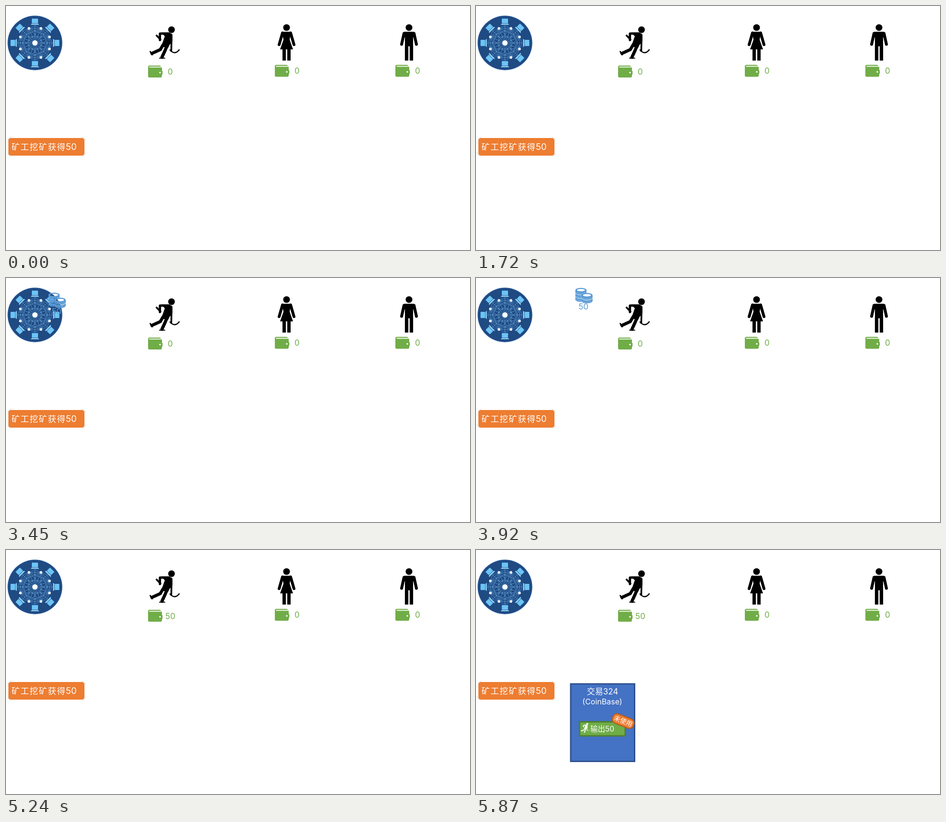
An HTML page with a canvas that plays this animation: 970x512 px, repeating every 7.9 s.

```html
<!DOCTYPE html>
<html lang="zh">
<head>
<meta charset="utf-8">
<title>挖矿奖励</title>
<style>
html, body { margin: 0; width: 100%; height: 100%; overflow: hidden; background: #fff; }
canvas { display: block; width: 970px; height: 512px; }
</style>
</head>
<body>
<canvas id="stage" width="970" height="512"></canvas>
<script>
const LOOP = 7900, STEP = 78.5;
const GREEN = '#70ad47', BLUE = '#5b9bd5', ORANGE = '#ed7d31';
const FONT = 'Inter, "Noto Sans CJK SC", "Noto Sans CJK", sans-serif';
const ctx = document.getElementById('stage').getContext('2d');
const clamp = v => Math.max(0, Math.min(1, v));

function at(c, x, y, scale, angle, draw) {
  c.save();
  c.translate(x, y);
  c.rotate(angle);
  c.scale(scale, scale);
  draw(c);
  c.restore();
}

function dot(c, x, y, r, color) {
  c.fillStyle = color;
  c.beginPath();
  c.arc(x, y, r, 0, Math.PI * 2);
  c.fill();
}

function poly(c, pts, color) {
  c.fillStyle = color;
  c.beginPath();
  pts.forEach(p => c.lineTo(p[0], p[1]));
  c.closePath();
  c.fill();
}

function line(c, pts, width, color, cap = 'round') {
  c.strokeStyle = color;
  c.lineWidth = width;
  c.lineCap = cap;
  c.lineJoin = 'round';
  c.beginPath();
  pts.forEach(p => c.lineTo(p[0], p[1]));
  c.stroke();
}

function box(c, x, y, w, h, r, fill, stroke, width) {
  c.beginPath();
  c.roundRect(x, y, w, h, r);
  if (fill) { c.fillStyle = fill; c.fill(); }
  if (stroke) { c.strokeStyle = stroke; c.lineWidth = width; c.stroke(); }
}

function label(c, text, x, y, size, color, align = 'center', weight = 400) {
  c.font = `${weight} ${size}px ${FONT}`;
  c.textAlign = align;
  c.textBaseline = 'alphabetic';
  c.fillStyle = color;
  c.fillText(text, x, y + size * 0.36);
}

function laptop(c) {
  box(c, -6.5, -6.5, 13, 9.5, 1, '#6cc4f5');
  poly(c, [[-6.5, 3.8], [6.5, 3.8], [8.8, 6.6], [-8.8, 6.6]], '#8fd2f8');
}

function network(c) {
  dot(c, 0, 0, 57.2, '#2c5c9c');
  dot(c, 0, 0, 56, '#1f4a82');
  const ring = (r, shift) => Array.from({ length: 8 }, (_, i) => {
    const a = (i + shift) * Math.PI / 4;
    return [r * Math.cos(a), r * Math.sin(a)];
  });
  const nodes = ring(33, 0.5), outer = ring(36, 0);
  nodes.forEach((p, i) => {
    nodes.slice(i + 1).forEach(q => line(c, [p, q], 0.8, '#6aaade'));
    line(c, [[0, 0], outer[i]], 0.8, '#6aaade');
    line(c, [p, outer[i]], 0.9, '#4d8fcc');
    line(c, [p, outer[(i + 1) % 8]], 0.9, '#4d8fcc');
  });
  nodes.forEach(p => dot(c, p[0], p[1], 2.7, '#fff'));
  dot(c, 0, 0, 5.5, '#fff');
  ring(44.5, 0).forEach((p, i) => at(c, p[0], p[1], 1, i === 2 ? 0 : (i + 2) * Math.PI / 4, laptop));
}

// Digging figure, 63 x 68 units from its top left corner
function miner(c, color) {
  dot(c, 46, 7.2, 7, color);
  poly(c, [[24, 13], [40, 13], [46, 15.5], [48, 19], [48, 31], [42, 39], [38, 47], [25, 41], [32, 21]], color);
  line(c, [[41, 15.3], [21.8, 15.3], [21.8, 29]], 4.8, color);
  line(c, [[14.8, 19.5], [23, 28]], 3.8, color);
  line(c, [[46.2, 18], [45.5, 52]], 3.6, color);
  c.beginPath();
  c.moveTo(43, 50);
  c.quadraticCurveTo(53, 61, 62, 49.5);
  c.strokeStyle = color;
  c.lineWidth = 2.6;
  c.stroke();
  line(c, [[29, 38], [22.5, 49], [5, 57]], 6.4, color);
  line(c, [[1.5, 53], [5.5, 60]], 2.6, color);
  line(c, [[36, 42], [32.5, 51], [26, 65]], 6.6, color);
  line(c, [[21, 67], [32, 67]], 2, color);
}

function woman(c) {
  const k = '#000';
  dot(c, 0, 7.3, 7, k);
  poly(c, [[-9, 16], [9, 16], [6.5, 33], [13.5, 53], [-13.5, 53], [-6.5, 33]], k);
  for (const s of [-1, 1]) {
    line(c, [[s * 8.5, 18.5], [s * 15.5, 43]], 6, k);
    c.fillRect(s * 5 - 3.5, 52, 7, 24.5);
  }
}

function man(c) {
  const k = '#000';
  dot(c, 0, 7.3, 7, k);
  box(c, -13, 16, 26, 12, 5, k);
  c.fillRect(-8.5, 18, 17, 28.5);
  for (const s of [-1, 1]) {
    line(c, [[s * 10.5, 19.5], [s * 15.5, 42.5]], 6, k);
    c.fillRect(s * 5 - 3.6, 45, 7.2, 31.5);
  }
}

function wallet(c) {
  box(c, 0, 0, 27, 8, 3, GREEN);
  box(c, 0, 2, 29, 23, 3, GREEN);
  line(c, [[3, 3.2], [29, 3.2]], 1.8, '#fff');
  box(c, 22, 10.5, 8.3, 9, 2, GREEN);
  dot(c, 25, 14.8, 1.7, '#fff');
}

function coin(c, x, y) {
  const rx = 11.7, ry = 4.8, h = 4.8;
  c.fillStyle = BLUE;
  c.beginPath();
  c.ellipse(x, y, rx, ry, 0, Math.PI, 0);
  c.ellipse(x, y + h, rx, ry, 0, 0, Math.PI);
  c.fill();
  c.globalCompositeOperation = 'destination-out';
  c.beginPath();
  c.ellipse(x, y, rx - 3.4, ry - 2.3, 0, 0, Math.PI * 2);
  c.fill();
  for (let i = -2; i <= 2; i++) {
    const dx = i * 4, dy = ry * Math.sqrt(1 - (dx / rx) ** 2);
    line(c, [[x + dx, y + dy + 1.4], [x + dx, y + dy + 3]], 0.8, '#000', 'butt');
  }
  c.lineWidth = 0.7;
  c.beginPath();
  c.ellipse(x, y + h + 0.6, rx, ry, 0, 0, Math.PI);
  c.stroke();
  c.globalCompositeOperation = 'source-over';
}

const sprite = document.createElement('canvas');
sprite.width = 120;
sprite.height = 120;
at(sprite.getContext('2d'), 60, 60, 2, 0, c => {
  [-4, -11.5, -19].forEach(y => coin(c, -6.3, y));
  [-1, -8.3].forEach(y => coin(c, 6.3, y));
  label(c, '50', -1, 15.5, 17, BLUE);
});

function coins(t) {
  const k = 2890 + Math.floor((t - 2890) / STEP) * STEP;
  const size = 1 - clamp((k - 4300) / 500);
  if (k < 2890 || size <= 0) return;
  const p = clamp((k - 3030) / 1580);
  const s = p < 0.5 ? 2 * p * p : 1 - 2 * (1 - p) ** 2;
  const bend = s < 0.5 ? 21.5 : 32;
  const x = 73 + 251 * s, y = 43 + bend * (2 * s - 1) ** 2;
  ctx.globalAlpha = clamp((k - 2890) / 500) * size;
  at(ctx, x, y, size / 2, 0, c => c.drawImage(sprite, -60, -60));
  ctx.globalAlpha = 1;
}

function button() {
  ctx.strokeStyle = '#dcdcdc';
  ctx.lineWidth = 1;
  [[12, 283, 2], [158, 283, 3], [158, 308, 0], [12, 308, 1]].forEach(([x, y, q]) => {
    ctx.beginPath();
    ctx.arc(x, y, 8, q * Math.PI / 2, (q + 1) * Math.PI / 2);
    ctx.stroke();
  });
  box(ctx, 5, 277, 159, 37, 5, ORANGE);
  ctx.letterSpacing = '1.5px';
  label(ctx, '矿工挖矿获得', 11.5, 295.5, 17.5, '#fff', 'left', 300);
  ctx.letterSpacing = '0px';
  label(ctx, '50', 125, 295, 18.5, '#fff', 'left');
}

function transaction(alpha) {
  box(ctx, 198, 281, 133.5, 162.5, 0, '#4472c4', '#2f528f', 3);
  label(ctx, '交易324', 264.5, 297, 17, '#fff');
  label(ctx, '(CoinBase)', 264, 318, 16, '#fff');
  box(ctx, 216.5, 360.5, 95.5, 29.5, 0, GREEN, '#507e32', 3);
  at(ctx, 219, 363, 0.295, 0, c => miner(c, '#fff'));
  label(ctx, '输出50', 239, 375, 15.5, '#fff', 'left');
  at(ctx, 307.7, 359, 1, 0.37, c => {
    box(c, -23.5, -10.5, 47, 21, 9, ORANGE, '#ae5a21', 2);
    label(c, '未使用', 0, 0, 13.5, '#fff');
  });
  ctx.fillStyle = `rgba(255,255,255,${1 - alpha})`;
  ctx.fillRect(195, 278, 140, 169);
}

function render(t) {
  ctx.fillStyle = '#fff';
  ctx.fillRect(0, 0, 970, 512);
  at(ctx, 60.5, 77.5, 1, 0, network);
  at(ctx, 300, 42.5, 1, 0, c => miner(c, '#000'));
  at(ctx, 586.5, 38, 1, 0, woman);
  at(ctx, 842.5, 38, 1, 0, man);

  const paid = clamp((Math.floor((t - 4620) / 77.5) - 1) / 7);
  at(ctx, 297, 125 + 0.5 * paid, 1, 0, wallet);
  ctx.globalAlpha = 1 - paid;
  label(ctx, '0', 343.3, 138, 17, GREEN);
  ctx.globalAlpha = paid;
  label(ctx, '50', 343.5, 139, 17, GREEN);
  ctx.globalAlpha = 1;
  for (const x of [562, 814]) {
    at(ctx, x, 123.5, 1, 0, wallet);
    label(ctx, '0', x + 46.3, 136, 17, GREEN);
  }

  button();
  coins(t);
  if (t >= 5390) transaction(clamp((Math.floor((t - 5390) / 80) + 1) / 7));
}

const start = performance.now();
(function tick() {
  render((performance.now() - start) % LOOP);
  requestAnimationFrame(tick);
})();
</script>
</body>
</html>
```
